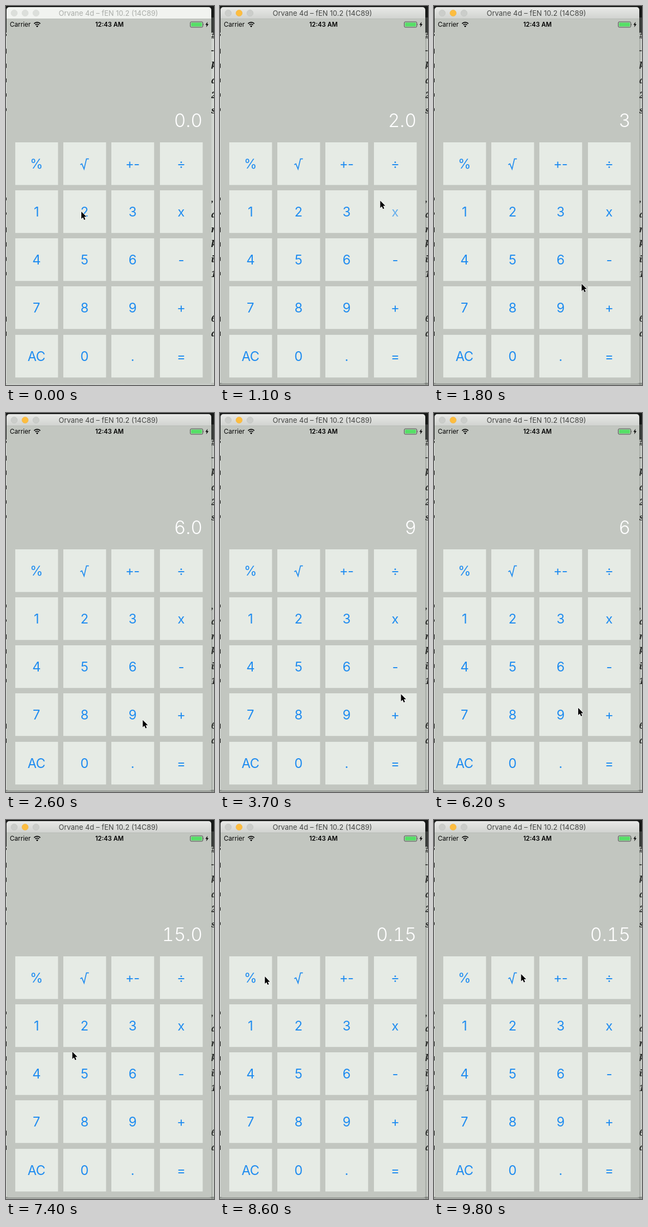
Recreate the animation shown at these times as an HTML page. Size 381 px wide and 695 px high, loop 9.9 s.

```html
<!DOCTYPE html>
<html lang="en">
<head>
<meta charset="utf-8">
<title>Calculator</title>
<style>
  html, body { margin: 0; width: 100%; height: 100%; overflow: hidden; background: #dfe3de; }
  svg { display: block; width: 381px; height: 695px; font-family: Inter, Roboto, sans-serif; }
  .page { font: italic bold 17px "Noto Serif", serif; fill: #111; }
  .key { font-size: 24px; fill: #1f8cf0; text-anchor: middle; letter-spacing: -.4px; }
  .root { fill: none; stroke: #1f8cf0; stroke-width: 1.7; }
  .title { font-size: 13px; text-anchor: middle; fill: #434543; }
  .light { fill: #cbcdca; stroke: #bdbfbc; stroke-width: .6; }
  .mid { fill: #fdbd3f; stroke: #eeb041; }
  .display { font-size: 33.5px; font-weight: 350; font-variant-numeric: tabular-nums; fill: #fff; text-anchor: end; }
  .idle .title { fill: #a9aca8; }
  .idle .bar { fill: #f1f3f0; }
  .idle .light { fill: #dcdfdb; stroke: #d3d6d2; }
  .idle .shade { opacity: .35; }
</style>
</head>
<body>
<svg id="stage" viewBox="0 0 381 695">
  <defs>
    <linearGradient id="barFill" x2="0" y2="1">
      <stop stop-color="#e8e9e7"/><stop offset="1" stop-color="#d0d2cf"/>
    </linearGradient>
    <linearGradient id="sideFill">
      <stop stop-color="#6e736d" stop-opacity=".55"/><stop offset="1" stop-color="#6e736d" stop-opacity=".1"/>
    </linearGradient>
    <linearGradient id="footFill" x2="0" y2="1">
      <stop stop-color="#4f534f" stop-opacity=".6"/><stop offset="1" stop-color="#6b706a" stop-opacity=".45"/>
    </linearGradient>
  </defs>
  <rect width="381" height="695" fill="#dfe3de"/>
  <rect width="381" height="49" fill="#171918"/>
  <rect x="376" y="21" width="5" height="28" fill="#3a3d3b"/>
  <g id="page" class="page"></g>
  <g class="shade">
    <rect x="376" y="49" width="5" height="646" fill="url(#sideFill)"/>
    <rect y="691" width="381" height="4" fill="url(#footFill)"/>
  </g>
  <path d="M1 24V7a5 5 0 0 1 5-5H371a5 5 0 0 1 5 5V24z" fill="url(#barFill)" class="bar"/>
  <path d="M1 24H376V688a4 4 0 0 1-4 4H5a4 4 0 0 1-4-4z" fill="#c2c6c0"/>
  <path d="M1 23.5H376" stroke="#b3b6b1" stroke-width=".8"/>
  <circle class="light" cx="15" cy="13" r="5.8"/>
  <circle class="light mid" cx="35" cy="13" r="5.8"/>
  <circle class="light" cx="55" cy="13" r="5.8"/>
  <text class="title" x="187.5" y="18">Orvane 4d – fEN 10.2 (14C89)</text>

  <text x="7" y="38.3" font-size="11.7">Carrier</text>
  <path d="M51.4 32.3a8.1 8.1 0 0 1 11.4 0M53.6 34.7a5 5 0 0 1 7 0" fill="none" stroke="#000" stroke-width="1.7"/>
  <path d="M57.1 39l-2-2.3a3 3 0 0 1 4 0z"/>
  <text x="189.5" y="38.3" font-size="11.4" font-weight="600" text-anchor="middle">12:43 AM</text>
  <rect x="337.5" y="29" width="23" height="10" rx="2" fill="none" stroke="#3c413c" stroke-width=".9"/>
  <rect x="339" y="30.5" width="20" height="7" rx=".8" fill="#55df66"/>
  <path d="M361.6 32.3q1.6 1.7 0 3.4z" fill="#3c413c"/>
  <path d="M369.4 29l-4.2 5.6h2.5l-1 4.4 4.3-5.8h-2.6z"/>

  <text id="display" class="display" x="360" y="222"></text>
  <g id="keys"></g>
  <path id="cursor" d="M0 0V13.2L3 10.4 5.1 15.2 7.3 14.2 5.2 9.6H9.3z" stroke="#fff" stroke-width="1.4" paint-order="stroke" stroke-linejoin="round"/>
</svg>
<script>
const LOOP = 9900, STEP = 100;
const $ = id => document.getElementById(id);

function add(parent, tag, attrs, text = "") {
  const el = document.createElementNS("http://www.w3.org/2000/svg", tag);
  for (const name in attrs) el.setAttribute(name, attrs[name]);
  el.textContent = text;
  parent.append(el);
  return el;
}

// Slivers of the written page behind the window, one letter per line
[..."#-ka2s     ,arki1  6a"].forEach((ch, i) => {
  const y = 60 + 27.3 * i;
  add($("page"), "text", { x: 375.5, y }, ch);
  if (ch !== " ") add($("page"), "rect", { x: 0, y: y - 9, width: 1, height: 4 + i * 5 % 6 });
});

const keys = {};
"% √ +- ÷ 1 2 3 x 4 5 6 - 7 8 9 + AC 0 . =".split(" ").forEach((label, i) => {
  const x = Math.round(16.7 + i % 4 * 88.3), y = Math.round(249.7 + Math.floor(i / 4) * 88.25);
  add($("keys"), "rect", { x, y, width: 78.3, height: 78.2, fill: "#e6ebe5" });
  const face = label === "√"
    ? add($("keys"), "path", { class: "root", d: `M${x + 31} ${y + 41}l3-1.6 4 9.6 4.4-18.6h4.4` })
    : add($("keys"), "text", { class: "key", x: x + 38.7, y: y + 48.2 }, label);
  keys[label] = { face, x: x + 33, y: y + 39 };
});

const maths = { "x": (a, b) => a * b, "+": (a, b) => a + b };

// Runs the calculator through the presses, noting what it shows after each
function calculate(list) {
  let held = 0, op = null, value = 0;
  return list.map(([at, key]) => {
    if (/\d/.test(key)) {
      value = +key;
      return { at, key, shown: key };
    }
    if (key === "%") value /= 100;
    else {
      if (op) value = op(held, value);
      held = value;
      op = maths[key];
    }
    return { at, key, shown: Number.isInteger(value) ? value.toFixed(1) : String(value) };
  });
}

const presses = calculate([
  [600, "2"], [900, "x"], [1400, "3"], [2200, "="], [2800, "9"],
  [3900, "+"], [5800, "6"], [6700, "="], [8000, "%"]
]);

// The pointer rests on each key around its press and bends through a few points on the way
const bends = [
  [1100, 293.5, 357], [2600, 250.5, 563], [3700, 331.5, 515.5],
  [5200, 322.5, 412], [7400, 121.5, 425], [9800, 159.5, 282.5]
];
const rests = presses.flatMap(({ at, key }) =>
  [at - STEP, at + STEP].map(t => [t, keys[key].x, keys[key].y]));
const path = [...rests, ...bends].sort((a, b) => a[0] - b[0]);

function pointAt(t) {
  const i = path.findIndex(p => p[0] >= t);
  if (i < 1) return path[0].slice(1);
  const [t0, x0, y0] = path[i - 1], [t1, x1, y1] = path[i];
  const k = (t - t0) / (t1 - t0);
  return [x0 + (x1 - x0) * k, y0 + (y1 - y0) * k];
}

// A pressed label dims, holds, then comes back
const fade = age => age < 0 ? 1 : Math.min(1, Math.max(0.3, 0.3 + (age - STEP) / 300));

function draw(t) {
  $("stage").classList.toggle("idle", t < 200);
  const shown = presses.findLast(p => t >= p.at + STEP)?.shown ?? "0.0";
  $("display").textContent = shown;
  for (const key in keys) {
    const last = presses.findLast(p => p.key === key && t >= p.at);
    keys[key].face.setAttribute("opacity", last ? fade(t - last.at) : 1);
  }
  $("cursor").setAttribute("transform", `translate(${pointAt(t)})`);
}

const start = performance.now();
function tick() {
  const t = (performance.now() - start) % LOOP;
  draw(Math.floor(t / STEP) * STEP);
  requestAnimationFrame(tick);
}
tick();
</script>
</body>
</html>
```
